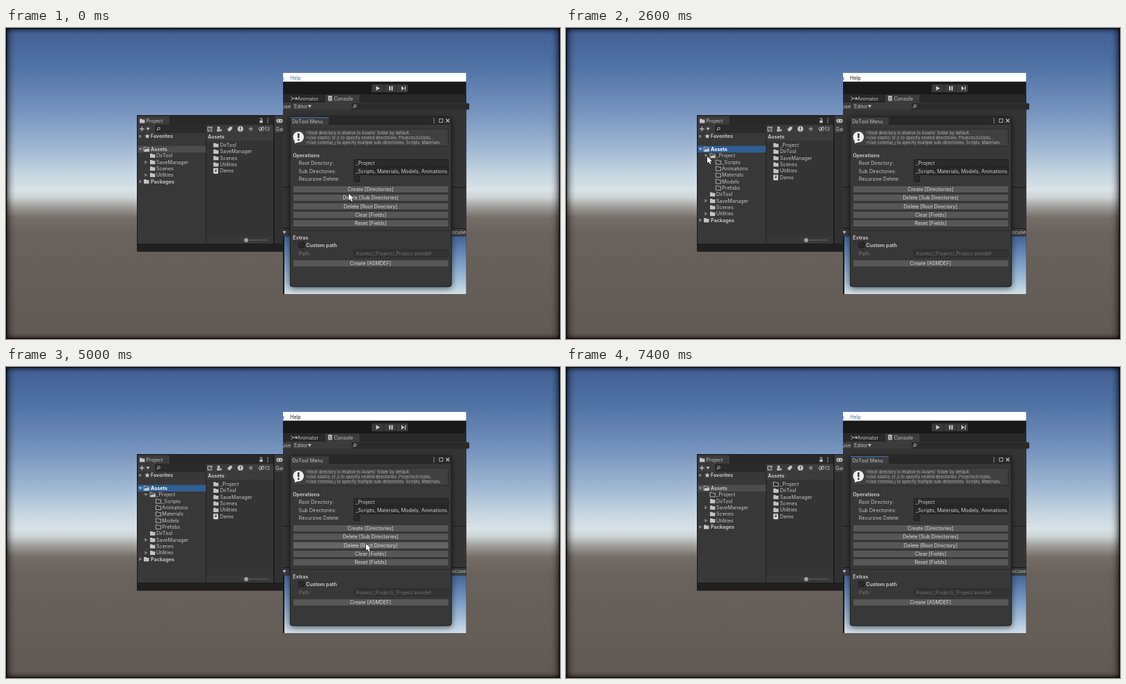
Animation of 800x450 px, one loop 8000 ms. Source, as an HTML page with a canvas:

```html
<!DOCTYPE html>
<html lang="en">
<head>
<meta charset="utf-8">
<title>Editor folders</title>
<style>
html, body { margin: 0; width: 100%; height: 100%; overflow: hidden; background: #000; }
canvas { display: block; width: 800px; height: 450px; }
</style>
</head>
<body>
<canvas id="stage" width="800" height="450"></canvas>
<script>
const ctx = document.getElementById('stage').getContext('2d');
const LOOP = 8000, STEP = 100;
const INK = '#c4c4c4', PANEL = '#383838', BAR = '#3c3c3c', DARK = '#282828';

// time, x, y of the pointer tip
const PATH = [
  [0, 495, 240], [100, 495, 240], [300, 502, 232], [900, 502, 232],
  [1200, 500, 256], [1600, 286, 146], [1800, 218, 186], [2200, 204, 186],
  [2800, 204, 186], [3300, 404, 236], [3700, 513, 270], [4100, 507, 278],
  [4600, 514, 266], [5400, 526, 246], [5900, 526, 246], [6000, 527, 251],
  [6300, 527, 251], [6700, 516, 262], [7200, 553, 256], [7300, 402, 255]
];
const BUTTONS = [
  ['Create [Directories]', 233.4], ['Delete [Sub Directories]', 245.7],
  ['Delete [Root Directory]', 258], ['Clear [Fields]', 270.3],
  ['Reset [Fields]', 282.6], ['Create [ASMDEF]', 340.7]
];

function rect(x, y, w, h, color) {
  ctx.fillStyle = color;
  ctx.fillRect(x, y, w, h);
}

function round(x, y, w, h, r, fill, stroke) {
  ctx.beginPath();
  ctx.roundRect(x, y, w, h, r);
  if (fill) { ctx.fillStyle = fill; ctx.fill(); }
  if (stroke) { ctx.strokeStyle = stroke; ctx.lineWidth = 0.8; ctx.stroke(); }
}

function poly(points, fill, stroke, width = 0.9) {
  ctx.beginPath();
  points.forEach(([x, y], i) => i ? ctx.lineTo(x, y) : ctx.moveTo(x, y));
  if (fill) { ctx.closePath(); ctx.fillStyle = fill; ctx.fill(); }
  if (stroke) { ctx.strokeStyle = stroke; ctx.lineWidth = width; ctx.stroke(); }
}

function disc(x, y, r, fill, stroke) {
  ctx.beginPath();
  ctx.arc(x, y, r, 0, Math.PI * 2);
  if (fill) { ctx.fillStyle = fill; ctx.fill(); }
  if (stroke) { ctx.strokeStyle = stroke; ctx.lineWidth = 0.9; ctx.stroke(); }
}

// y is the middle of the capitals
function label(str, x, y, { size = 7.15, bold = false, color = INK, align = 'left' } = {}) {
  ctx.font = `${bold ? 700 : 400} ${size}px Inter, Roboto, sans-serif`;
  ctx.textAlign = align;
  ctx.textBaseline = 'alphabetic';
  ctx.fillStyle = color;
  ctx.fillText(str, x, y + size * 0.36);
}

function clipped(x, y, w, h, draw) {
  ctx.save();
  ctx.beginPath();
  ctx.rect(x, y, w, h);
  ctx.clip();
  draw();
  ctx.restore();
}

function shade(x0, y0, x1, y1, stops) {
  const g = ctx.createLinearGradient(x0, y0, x1, y1);
  stops.forEach(([at, color]) => g.addColorStop(at, color));
  return g;
}

function triangle(x, y, open, color = '#858585') {
  poly(open ? [[x - 2.5, y - 1.7], [x + 2.5, y - 1.7], [x, y + 2.2]]
            : [[x - 1.6, y - 2.6], [x + 2.2, y], [x - 1.6, y + 2.6]], color);
}

function star(x, y, r, color) {
  const points = [];
  for (let i = 0; i < 10; i++) {
    const a = i * Math.PI / 5 - Math.PI / 2, d = i % 2 ? r * 0.45 : r;
    points.push([x + d * Math.cos(a), y + d * Math.sin(a)]);
  }
  poly(points, color);
}

function dots(x, y) {
  for (const d of [-2.8, 0, 2.8]) disc(x, y + d, 0.8, INK);
}

function lens(x, y) {
  disc(x + 0.6, y - 0.6, 1.8, null, INK);
  poly([[x - 0.7, y + 0.7], [x - 2.3, y + 2.4]], null, INK, 1);
}

function folder(x, y, kind = 'full') {
  const body = [[x, y - 3], [x + 3, y - 3], [x + 4, y - 2], [x + 7.4, y - 2],
                [x + 7.4, y + 3.1], [x, y + 3.1], [x, y - 3]];
  if (kind === 'full') return poly(body, INK);
  poly(body, null, INK, 0.85);
  if (kind === 'open') {
    poly([[x + 1.8, y - 0.3], [x + 8.4, y - 0.3], [x + 7, y + 3.4], [x, y + 3.4]], INK);
  }
}

function backdrop() {
  rect(0, 0, 800, 450, shade(0, 0, 0, 450, [
    [0, '#405f94'], [0.13, '#5273a6'], [0.27, '#7694be'], [0.38, '#9cb5d1'],
    [0.46, '#c1d2df'], [0.52, '#d9e3e7'], [0.545, '#cdd3d4'], [0.575, '#a09e9b'],
    [0.61, '#756e69'], [0.66, '#6a625c'], [1, '#615953']
  ]));
  const edge = (x, y, w, h, x0, y0, x1, y1) => rect(x, y, w, h, shade(x0, y0, x1, y1, [
    [0, 'rgba(0,0,0,.78)'], [0.25, 'rgba(0,0,0,.36)'], [0.6, 'rgba(0,0,0,.1)'], [1, 'rgba(0,0,0,0)']
  ]));
  edge(0, 0, 14, 450, 0, 0, 14, 0);
  edge(786, 0, 14, 450, 800, 0, 786, 0);
  edge(0, 0, 800, 10, 0, 0, 0, 10);
  edge(0, 440, 800, 10, 0, 450, 0, 440);
  rect(0, 0, 800, 1, '#050505');
  rect(0, 449, 800, 1, '#0b0a0a');
  rect(0, 0, 1, 450, '#080808');
  rect(799, 0, 1, 450, '#080808');
}

function tree(s) {
  let y = 156.7;
  const next = (n = 1) => { y += 9.34 * n; };
  triangle(194, y, false);
  star(204, y, 4, INK);
  label('Favorites', 209, y, { bold: true });
  next(2);
  rect(190, y - 4.8, 98.5, 9.6, s.picked ? '#315f94' : '#4c4c4c');
  triangle(194, y, true, s.picked ? '#b0bccb' : '#8c8c8c');
  folder(199, y, 'open');
  label('Assets', 209, y, { bold: true, color: s.picked ? '#fff' : INK });
  next();
  const row = (name, level, kind, arrow) => {
    const x = 208 + level * 8.3;
    if (arrow) triangle(x - 6, y, arrow === 'open');
    folder(x, y, kind);
    label(name, x + 9, y);
    next();
  };
  if (s.project === 'closed') row('_Project', 0, 'full', 'closed');
  if (s.project === 'empty') row('_Project', 0, 'empty');
  if (s.project === 'open') {
    row('_Project', 0, 'open', 'open');
    for (const name of ['_Scripts', 'Animations', 'Materials', 'Models', 'Prefabs']) row(name, 1, 'empty');
  }
  row('DirTool', 0, 'full');
  row('SaveManager', 0, 'full', 'closed');
  row('Scenes', 0, 'full');
  row('Utilities', 0, 'full', 'closed');
  triangle(194, y, false);
  folder(199, y);
  label('Packages', 209, y, { bold: true });
}

function fileList(s) {
  const names = ['DirTool', 'SaveManager', 'Scenes', 'Utilities'];
  if (s.project !== 'none') names.unshift('_Project');
  let y = 169.5;
  for (const name of names) {
    folder(299.5, y, name === '_Project' && s.project === 'empty' ? 'empty' : 'full');
    label(name, 309, y);
    y += 9.34;
  }
  round(299.5, y - 4, 6.8, 8, 0.8, '#e4e4e4');
  label('#', 303, y, { size: 6, bold: true, color: '#444', align: 'center' });
  label('Demo', 309, y);
}

function toolbarIcons() {
  const y = 146;
  ctx.lineWidth = 1;
  ctx.strokeStyle = INK;
  ctx.strokeRect(291.5, y - 2.5, 5.5, 5.5);
  poly([[293, y + 1.5], [297.5, y - 3]], null, INK);
  disc(307, y - 1.6, 2, INK);
  poly([[304.6, y + 3.6], [304.6, y + 0.6], [309.5, y + 0.6], [309.5, y + 3.6]], INK);
  poly([[310, y], [312, y + 2], [310, y + 4]], INK);
  poly([[319.5, y + 1], [323, y - 3], [326.5, y - 3.3], [326.5, y], [322.5, y + 4]], INK);
  disc(338.5, y, 4.1, INK);
  rect(338, y - 2.6, 1.1, 3.3, BAR);
  rect(338, y + 1.5, 1.1, 1.1, BAR);
  star(353.5, y, 4, '#858585');
  ctx.beginPath();
  ctx.ellipse(369, y, 4, 2.3, 0, 0, Math.PI * 2);
  ctx.strokeStyle = INK;
  ctx.stroke();
  disc(369, y, 1.2, INK);
  poly([[366, y + 3.5], [372, y - 3.5]], null, INK);
  label('13', 373.5, y);
}

function projectPanel(s) {
  rect(189, 126, 211, 197.5, '#191919');
  rect(190, 127, 196, 13, DARK);
  rect(190, 127.5, 46, 12.5, BAR);
  folder(193, 134.5);
  label('Project', 202.5, 134.6);
  round(366.2, 133.7, 4.4, 3.6, 0.4, INK);
  poly([[366.9, 132], [366.9, 131], [369.6, 131], [369.6, 134]], null, INK);
  dots(378, 134);
  rect(190, 140, 196, 12.2, BAR);
  rect(190, 139.7, 196, 0.6, '#2c2c2c');
  rect(193, 145.4, 6.6, 1.3, INK);
  rect(195.7, 142.7, 1.3, 6.6, INK);
  triangle(205, 146, true, INK);
  round(215.5, 141, 73, 10, 2, '#2a2a2a', '#222');
  lens(220, 146);
  toolbarIcons();
  rect(190, 152.2, 98.5, 159.8, PANEL);
  rect(289.3, 152.2, 96.7, 159.8, '#343434');
  rect(289.3, 152.2, 96.7, 10.8, BAR);
  label('Assets', 291.5, 157.7, { bold: true });
  tree(s);
  fileList(s);
  rect(289.3, 301.6, 96.7, 10.4, PANEL);
  rect(345, 306.4, 33, 1, '#666');
  disc(346.8, 307, 3, '#a0a0a0');
  rect(190, 312.5, 210, 11, '#202020');
  rect(387.5, 127, 12.5, 13, BAR);
  rect(387.5, 140.3, 12.5, 11.8, BAR);
  rect(387.5, 152.2, 12.5, 160, '#303030');
  round(390.5, 131.8, 9, 5.3, 2.4, INK);
  disc(393, 134.4, 1, BAR);
  disc(397, 134.4, 1, BAR);
  clipped(388, 140, 12, 12, () => label('Game', 389.3, 146));
}

function editorPane(s) {
  rect(400, 65, 264.5, 320, '#191919');
  rect(400, 65, 264.5, 12.6, '#fff');
  const ink = s.focus ? '#407a9f' : '#1c1c1c';
  clipped(400, 65, 264, 13, () => label('s', 398.2, 72, { color: ink }));
  label('Help', 410.3, 72, { color: ink });
  round(528, 81.5, 52.5, 11.5, 1.5, '#3a3a3a');
  rect(545.5, 81.5, 0.7, 11.5, '#222');
  rect(563, 81.5, 0.7, 11.5, '#222');
  poly([[534.5, 84], [540, 87.2], [534.5, 90.4]], '#d2d2d2');
  rect(553.2, 84.2, 2, 6.2, '#d2d2d2');
  rect(556.5, 84.2, 2, 6.2, '#d2d2d2');
  poly([[571, 84], [575.3, 87.2], [571, 90.4]], INK);
  rect(576, 84.2, 1.2, 6.2, INK);

  rect(400, 96, 264.5, 12, DARK);
  rect(461, 96.3, 49.5, 12, BAR);
  poly([[411.5, 99.5], [415, 102], [420, 102]], null, INK);
  poly([[411.5, 104.5], [415, 102]], null, INK);
  poly([[418.3, 99.8], [421.3, 102], [418.3, 104.2]], INK);
  label('Animator', 420.8, 102);
  round(465.2, 98, 5.6, 7.6, 1, INK);
  for (const y of [100, 101.8, 103.6]) rect(466.4, y, 3.2, 0.6, BAR);
  label('Console', 473.5, 102);
  rect(400, 108, 264.5, 10.8, BAR);
  clipped(400, 108, 264, 12, () => label('use', 411.2, 113.3, { align: 'right' }));
  rect(412.8, 108.3, 0.7, 10.5, '#262626');
  label('Editor', 416, 113.3);
  triangle(438.5, 113.3, true, INK);
  round(499, 108.8, 170, 9.5, 2, '#2a2a2a');
  lens(503.5, 113.4);
  rect(400, 118.8, 264.5, 171, '#343434');
  rect(400, 230, 264.5, 1, '#1d1d1d');
  rect(400, 289.8, 264.5, 1, '#191919');
  rect(400, 290.8, 264.5, 10.4, BAR);
  triangle(402, 295.6, true, INK);
  clipped(400, 290, 264.5, 12, () => label('ocused', 643.5, 295.8));
  rect(402, 301.5, 262.5, 83.5, shade(0, 301, 0, 385, [
    [0, '#426596'], [0.4, '#7395bf'], [0.75, '#a3bfd8'], [1, '#d3e0e6']
  ]));
}

function field(y, text, dim) {
  round(502.4, y - 5.2, 136.6, 10.4, 1.5, dim ? '#323232' : '#2a2a2a', dim ? '#2b2b2b' : '#1c1c1c');
  clipped(503, y - 5, 135.3, 10, () => label(text, 505, y, { color: dim ? '#747474' : '#cecece' }));
}

function checkbox(x, y) {
  round(x, y - 4.1, 8, 8.2, 1.2, '#2a2a2a', '#1b1b1b');
}

function toolWindow(s) {
  clipped(400, 65, 264.5, 320, () => {
    ctx.shadowColor = 'rgba(0,0,0,.6)';
    ctx.shadowBlur = 10;
    ctx.shadowOffsetY = 2;
    round(410, 128.3, 233.5, 246.3, 4, '#1e1e1e');
  });
  round(410.5, 128.8, 232.5, 245.3, 4, PANEL, '#202020');
  rect(411, 129.2, 231.5, 11, DARK);
  rect(411, 129.2, 55, 11.2, BAR);
  if (s.focus) rect(411, 129, 55, 1.1, '#3a72b0');
  label('DirTool Menu', 413.2, 135.2);
  dots(618, 134);
  ctx.strokeStyle = INK;
  ctx.lineWidth = 0.8;
  ctx.strokeRect(625.7, 131.5, 5, 5);
  poly([[635.5, 131.5], [640.3, 136.5]], null, INK, 1.1);
  poly([[640.3, 131.5], [635.5, 136.5]], null, INK, 1.1);

  round(412.5, 146.3, 226, 24.8, 2, '#404040', '#272727');
  disc(422.3, 157.8, 7.8, '#f0f0f0');
  poly([[416.5, 161], [417, 167], [423, 165]], '#f0f0f0');
  rect(421.2, 152.3, 2.4, 6.8, '#343434');
  rect(421.2, 160.6, 2.4, 2.4, '#343434');
  [">Root directory is relative to Assets' folder by default.",
   '>Use slash(\\ or /) to specify nested directories: Projects\\Scripts\\..',
   '>Use comma(,) to specify multiple sub-directories: Scripts, Materials..'
  ].forEach((line, i) => label(line, 433, 152.1 + i * 7.05, { size: 5.95, color: '#b4b4b4' }));

  label('Operations', 414.3, 184.3, { bold: true });
  label('Root Directory:', 422.8, 195.6);
  field(195.5, '_Project');
  label('Sub Directories:', 422.8, 207.2);
  field(207.2, '_Scripts, Materials, Models, Animations, Prefabs');
  label('Recursive Delete:', 422.8, 218.6);
  checkbox(502.7, 218.4);
  BUTTONS.forEach(([name, y], i) => {
    const over = s.tip && s.tip[0] > 414 && s.tip[0] < 639 && Math.abs(s.tip[1] - y) < 5.3;
    const fill = s.pressed === i ? '#42618f' : over ? '#656565' : '#575757';
    round(414.4, y - 5.1, 224.8, 10.2, 1.2, fill, '#303030');
    label(name, 526.5, y, { align: 'center', color: '#dedede' });
  });
  rect(411, 292.6, 231.5, 1, '#292929');
  label('Extras', 414.3, 303.2, { bold: true });
  checkbox(422.8, 314);
  label('Custom path', 433.2, 314.4, { bold: true });
  label('Path:', 422.8, 326, { color: '#7c7c7c' });
  field(326, 'Assets/_Project/_Project.asmdef', true);
}

function pointer([x, y]) {
  const arrow = [[0, 0], [0, 9.3], [2.2, 7.4], [3.9, 11], [5.5, 10.2], [3.9, 6.8], [6.9, 6.6], [0, 0]];
  const points = arrow.map(([dx, dy]) => [x + dx, y + dy]);
  poly(points, null, '#222', 1.1);
  poly(points, '#fff');
}

function tipAt(t) {
  if (t >= 7400) return null;
  const i = PATH.findIndex(p => p[0] > t);
  if (i < 0) return PATH[PATH.length - 1].slice(1);
  const [t0, x0, y0] = PATH[i - 1], [t1, x1, y1] = PATH[i];
  const u = (t - t0) / (t1 - t0), k = u * u * (3 - 2 * u);
  return [x0 + (x1 - x0) * k, y0 + (y1 - y0) * k];
}

function stateAt(t) {
  const away = t >= 2400 && t < 5600;
  return {
    tip: tipAt(t),
    focus: !away,
    picked: away,
    project: t < 500 ? 'none' : t < 2400 ? 'closed' : t < 5700 ? 'open' : 'empty',
    pressed: t >= 400 && t < 500 ? 0 : t >= 5600 && t < 5700 ? 1 : -1
  };
}

function frame(now) {
  const t = Math.floor(now % LOOP / STEP) * STEP;
  const s = stateAt(t);
  backdrop();
  projectPanel(s);
  editorPane(s);
  toolWindow(s);
  if (s.tip) pointer(s.tip);
  requestAnimationFrame(frame);
}
frame(0);
</script>
</body>
</html>
```
